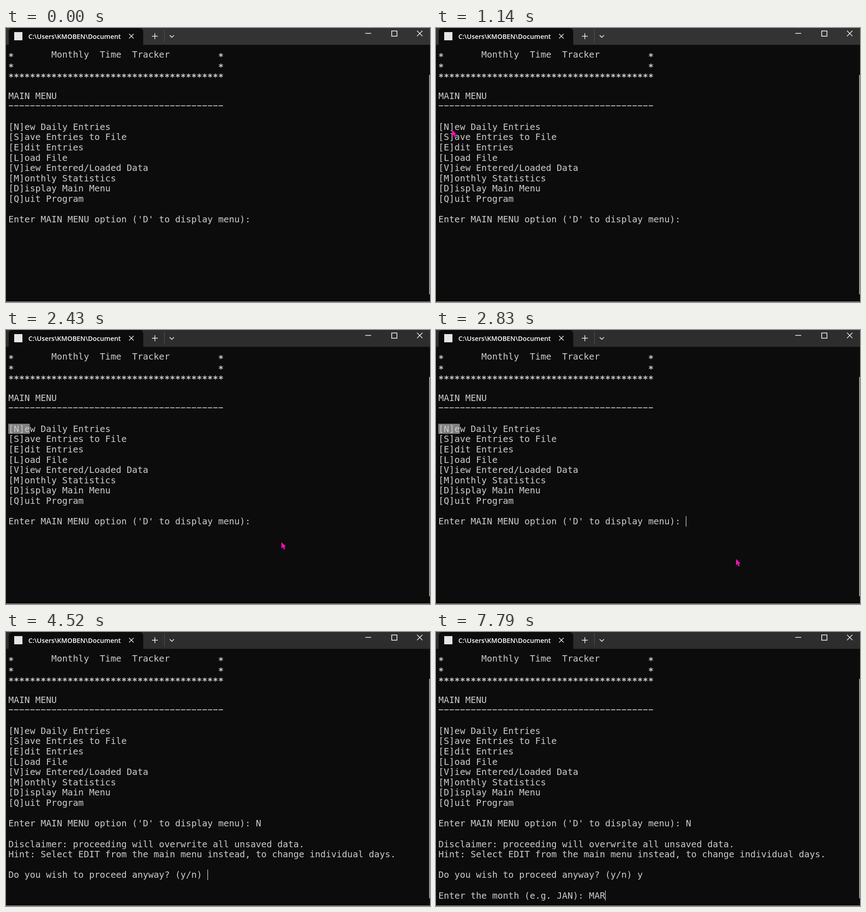
Write an HTML page with a canvas that moves like this. It is 930 px wide and 602 px high and loops after 8 s.

```html
<!DOCTYPE html>
<html lang="en">
<head>
<meta charset="utf-8">
<title>Monthly Time Tracker</title>
<style>
html, body { margin: 0; width: 100%; height: 100%; overflow: hidden; background: #0c0c0c; }
canvas { display: block; }
</style>
</head>
<body>
<canvas id="stage" width="930" height="602"></canvas>
<script>
const ctx = document.getElementById('stage').getContext('2d');
const LOOP = 8000, BLINK = 540;
const FOCUS = 1410, DRAG = 2150, DESELECT = 2910;
const CELL = 11.8, ROW = 22.62, LEFT = 5.2, TOP = 47.4;
const BG = '#0c0c0c', FG = '#cccccc', WHITE = '#ffffff';
const MONO = '19.6px "DejaVu Sans Mono", monospace';

const menu = `*       Monthly  Time  Tracker         *
*${' '.repeat(38)}*
${'*'.repeat(40)}

MAIN MENU
${'-'.repeat(40)}

[N]ew Daily Entries
[S]ave Entries to File
[E]dit Entries
[L]oad File
[V]iew Entered/Loaded Data
[M]onthly Statistics
[D]isplay Main Menu
[Q]uit Program

Enter MAIN MENU option ('D' to display menu): `;

const warning = `

Disclaimer: proceeding will overwrite all unsaved data.
Hint: Select EDIT from the main menu instead, to change individual days.

Do you wish to proceed anyway? (y/n) `;

// Each entry appends text and restarts the caret blink
const session = [
  [0, menu], [FOCUS, ''], [3700, 'N'], [4480, warning], [5980, 'y'],
  [6580, '\n\nEnter the month (e.g. JAN): '], [7540, 'M'], [7720, 'A'], [7790, 'R']
];

const smooth = u => u * u * (3 - 2 * u);
const easeOut = u => 1 - (1 - u) ** 3;

// Pointer moves; bow lifts the middle of the path
const moves = [
  { from: 190, to: 590, a: [669, 580], b: [666, 507], bow: 0, ease: smooth },
  { from: 590, to: 1200, a: [666, 507], b: [18, 217], bow: 14, ease: smooth },
  { from: DRAG, to: DRAG + 500, a: [18, 217], b: [658, 503], bow: 50, ease: easeOut }
];

const arrow = new Path2D('M0 0V14L3.2 11.2L5.6 16.4L8.2 15.2L5.9 10.2H10Z');
const clamp = v => Math.max(0, Math.min(1, v));
const colX = col => LEFT + col * CELL;
const rowY = row => TOP + row * ROW;

function box(x, y, w, h, color) {
  ctx.fillStyle = color;
  ctx.fillRect(x, y, w, h);
}

function line(width, ...points) {
  ctx.strokeStyle = WHITE;
  ctx.lineWidth = width;
  ctx.beginPath();
  for (const [x, y] of points) ctx.lineTo(x, y);
  ctx.stroke();
}

function cross(x, y, r) {
  line(1.3, [x - r, y - r], [x + r, y + r]);
  line(1.3, [x + r, y - r], [x - r, y + r]);
}

function drawTitleBar(focused) {
  box(0, 0, 930, 37, focused ? '#2d2d2d' : '#333333');
  ctx.fillStyle = BG;
  ctx.beginPath();
  ctx.roundRect(6, 0, 295, 38, [8, 8, 0, 0]);
  ctx.fill();

  box(18, 9, 18, 18, '#e6e6e6');
  ctx.fillStyle = WHITE;
  ctx.font = '600 14.3px "Open Sans", sans-serif';
  ctx.fillText('C:\\Users\\KMOBEN\\Document', 49, 24);
  cross(275, 18, 5);

  line(1.4, [320, 18], [333, 18]);
  line(1.4, [326.5, 11.5], [326.5, 24.5]);
  box(347, 3, 1, 29, '#555555');
  line(1.5, [359, 16], [363.7, 20.5], [368.4, 16]);

  box(788, 11, 13, 1.4, WHITE);
  ctx.strokeRect(846, 6.5, 11.5, 11.5);
  cross(907.5, 12, 6);
}

function drawGlyph(ch, x, y) {
  if (ch === '-') return box(x + 0.9, y + 9.5, 9.6, 1.7, FG);
  const star = ch === '*';
  ctx.fillStyle = FG;
  ctx.font = star ? 'bold ' + MONO : MONO;
  ctx.fillText(ch, x, y + (star ? 21.5 : 18));
}

function drawSession(t) {
  const past = session.filter(([time]) => time <= t);
  const lines = past.map(([, text]) => text).join('').split('\n');
  lines.forEach((text, row) =>
    [...text].forEach((ch, col) => drawGlyph(ch, colX(col), rowY(row))));

  const idle = t - past.at(-1)[0];
  if (t < FOCUS || idle % (2 * BLINK) >= BLINK) return;
  const row = lines.length - 1;
  const y = Math.round(rowY(row));
  box(Math.round(colX(lines[row].length)), y, 1, Math.round(rowY(row + 1)) - y, WHITE);
}

function drawPointer(t) {
  const move = moves.findLast(m => t >= m.from);
  if (!move || t >= DESELECT) return;
  const { from, to, a, b, bow, ease } = move;
  const p = ease(clamp((t - from) / (to - from)));
  ctx.save();
  ctx.translate(a[0] + (b[0] - a[0]) * p,
                a[1] + (b[1] - a[1]) * p - bow * Math.sin(Math.PI * p));
  ctx.fillStyle = '#ff0cb8';
  ctx.fill(arrow);
  ctx.restore();
}

function drawClick(t) {
  const level = Math.min(clamp((t - FOCUS) / 180), clamp((1950 - t) / 190));
  ctx.fillStyle = `rgba(255, 230, 20, ${0.62 * level})`;
  ctx.beginPath();
  ctx.arc(18, 218.5, 14.7, 0, Math.PI * 2);
  ctx.fill();
}

function draw(t) {
  box(0, 0, 930, 602, BG);
  drawTitleBar(t >= FOCUS);
  if (t >= DRAG && t < DESELECT) box(5, 206, 4 * CELL, 22, '#808080');
  drawSession(t);
  box(928, 103, 2, 482, '#9c9c9c');
  box(0, 601, 930, 1, '#b0b0b0');
  drawPointer(t);
  drawClick(t);
}

const start = performance.now();
function tick() {
  draw((performance.now() - start) % LOOP);
  requestAnimationFrame(tick);
}
tick();
</script>
</body>
</html>
```
